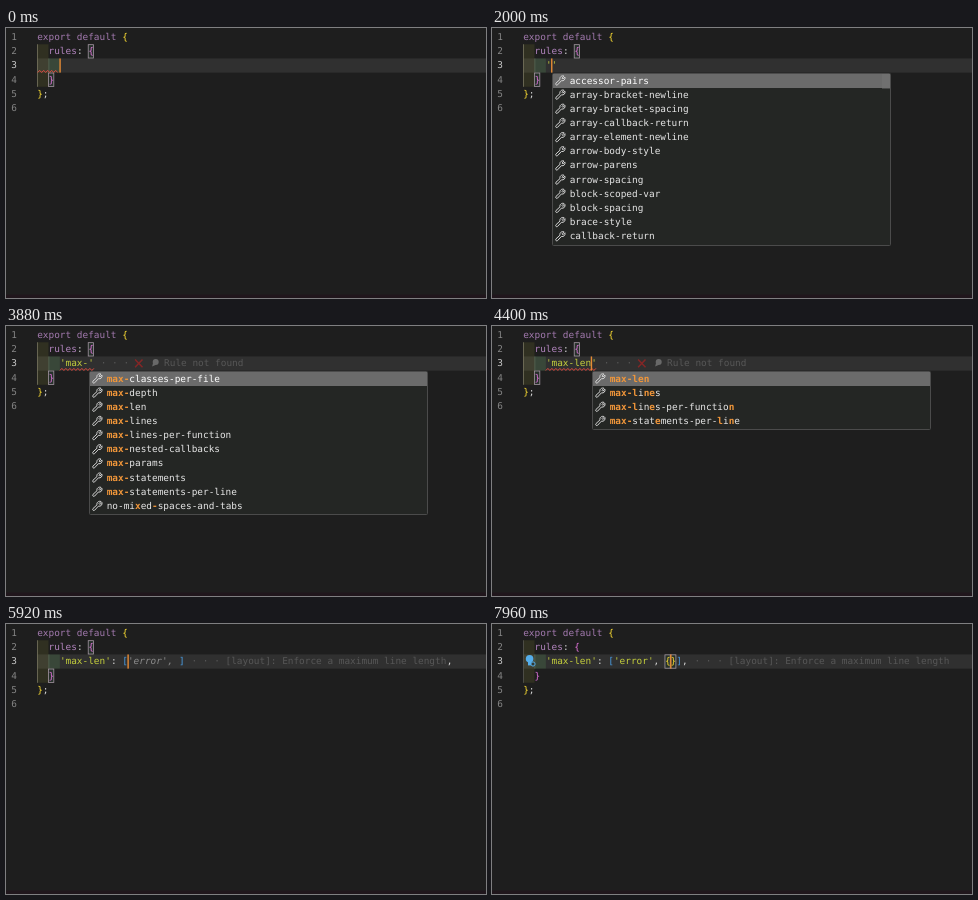
These frames come from a looping animation (480x270 px, 8000 ms). An HTML page:

```html
<!DOCTYPE html>
<html lang="en">
<head>
<meta charset="utf-8">
<title>Editor completion</title>
<style>
  html, body { margin: 0; width: 100%; height: 100%; overflow: hidden; background: #1e1e1e; }
  svg { display: block; width: 480px; height: 270px; }
  text {
    font: 9.42px "DejaVu Sans Mono", monospace;
    white-space: pre;
    text-rendering: geometricPrecision;
    fill: #d8d8d8;
  }
  .key { fill: #a279ae; }
  .prop { fill: #b184bd; }
  .gold { fill: #ffe033; }
  .pink { fill: #e274dc; }
  .blue { fill: #4a9fe6; }
  .str { fill: #c4ce3c; }
  .hint { fill: #8c8c8c; font-style: italic; }
  .ghost { fill: #575757; }
  .num { fill: #858585; }
  .now { fill: #c6c6c6; }
  .row { fill: #e6e6e6; }
  .picked { fill: #fff; }
  .hit { fill: #f0963a; font-weight: bold; }
</style>
</head>
<body>
<svg id="stage" viewBox="0 0 480 270" xmlns="http://www.w3.org/2000/svg"></svg>
<script>
const LOOP = 8000, X0 = 31.2, CW = 5.67, LH = 14.17, ROW = 14.16, TOP = 2.1;
const stage = document.getElementById('stage');

const colX = c => X0 + c * CW;
const lineY = n => TOP + (n - 1) * LH;
const baseY = n => lineY(n) + 10;
const esc = s => s.replace(/&/g, '&amp;').replace(/</g, '&lt;');
const rect = (x, y, w, h, fill, extra = '') =>
  `<rect x="${x}" y="${y}" width="${w}" height="${h}" fill="${fill}" ${extra}/>`;
const text = (x, y, s, cls = '') => `<text x="${x}" y="${y}" class="${cls}">${esc(s)}</text>`;
const code = (line, col, s, cls) => text(colX(col), baseY(line), s, cls);

const MAX = ['max-classes-per-file', 'max-depth', 'max-len', 'max-lines', 'max-lines-per-function',
  'max-nested-callbacks', 'max-params', 'max-statements', 'max-statements-per-line'];

// Angle brackets mark matched letters when they are not one run.
const LISTS = {
  all: { q: '', bar: 15, rows: ['accessor-pairs', 'array-bracket-newline', 'array-bracket-spacing',
    'array-callback-return', 'array-element-newline', 'arrow-body-style', 'arrow-parens',
    'arrow-spacing', 'block-scoped-var', 'block-spacing', 'brace-style', 'callback-return'] },
  m: { q: 'm', bar: 22, rows: [...MAX, 'multiline-comment-style', 'multiline-ternary', 'id-match'] },
  ma: { q: 'ma', bar: 31, rows: [...MAX, 'id-match', 'no-magic-numbers', 'no-<m>ulti-<a>ssign'] },
  max: { q: 'max', rows: [...MAX, 'no-mi<x>ed-oper<a>tors', 'no-mi<x>ed-sp<a>ces-and-tabs'] },
  dash: { q: 'max-', rows: [...MAX, 'no-mi<x>ed<->spaces-and-tabs'] },
  l: { q: 'max-l', rows: ['max-len', 'max-lines', 'max-lines-per-function', '<max->c<l>asses-per-file',
    '<max->nested-ca<l>lbacks', '<max->statements-per-<l>ine'] },
  le: { q: 'max-le', rows: ['max-len', '<max-l>in<e>s', '<max-l>in<e>s-per-function', '<max->c<l>ass<e>s-per-file'] },
  len: { q: 'max-len', rows: ['max-len', '<max-l>i<ne>s', '<max-l>in<e>s-per-functio<n>',
    '<max->stat<e>ments-per-<l>i<n>e'] }
};

const BAD = 'bad', GOOD = '[layout]: Enforce a maximum line length';
const quoted = s => [[`'${s}'`, 'str']];
const typing = (s, list, note = BAD) =>
  ({ parts: quoted(s), cur: 5 + s.length, list, note, wavy: note === BAD });
const head = [["'max-len'", 'str'], [': ', '']];
const open = [...head, ['[', 'blue']];
const filled = [...open, ["'error'", 'str'], [', ', '']];
const pair = [...filled, ['{}', 'gold'], [']', 'blue']];

const STEPS = [
  [0, { parts: [], cur: 4, wavy: true }],
  [1440, { parts: quoted(''), cur: 5 }],
  [1640, { parts: quoted(''), cur: 5, list: 'all' }],
  [2120, typing('m', 'm')],
  [2320, typing('ma', 'ma')],
  [2640, typing('max', 'max')],
  [3040, typing('max-', 'dash')],
  [3960, typing('max-l', 'l')],
  [4160, typing('max-le', 'le')],
  [4360, typing('max-len', 'len')],
  [4560, typing('max-len', 'len', GOOD)],
  [4960, { parts: head, cur: 15, note: GOOD }],
  [5920, { parts: [...open, ["'error', ", 'hint'], [']', 'blue']], cur: 16, note: GOOD, tail: ',' }],
  [6200, { parts: [...filled, [']', 'blue']], cur: 25, note: GOOD, tail: ',' }],
  [6480, { parts: pair, cur: 26, note: GOOD, tail: ',', inner: true }],
  [6960, { parts: [...pair, [',', '']], cur: 26, note: GOOD, inner: true }],
  [7280, { parts: [...pair, [',', '']], cur: 26, note: GOOD, inner: true, bulb: true }]
];
const BLINKS = [[720, 1200], [3520, 3960], [5440, 5920], [7440, 7840]];

function boxAt(line, col) {
  return rect(colX(col), lineY(line) + 0.4, CW - 0.4, LH - 0.8, '#26302a',
    'stroke="#a497a2" stroke-width=".8"');
}

function wave(from, to) {
  let d = `M${from} 44.5`;
  for (let x = from + 2, up = true; x <= to; x += 2, up = !up) d += `L${x} ${up ? 42.4 : 44.5}`;
  return `<path d="${d}" fill="none" stroke="#e04c40" stroke-width="1"/>`;
}

function note(col, s, tail) {
  const x = colX(col) + 1.2, y = baseY(3);
  const dots = text(x, y, ' · · · ', 'ghost');
  if (s !== BAD) {
    const end = x + (7 + s.length) * CW;
    return dots + text(x + 7 * CW, y, s, 'ghost') + (tail ? text(end, y, tail) : '');
  }
  return dots +
    `<path d="M${x + 40} 33.6l7.4 7.6m0-7.6l-7.4 7.6" stroke="#842626" stroke-width="1.5"/>` +
    `<circle cx="${x + 60.6}" cy="36" r="3" fill="#696969"/>` +
    `<path d="M${x + 58} 36.5l-1 4 4-1.8z" fill="#696969"/>` +
    text(x + 69, y, 'Rule not found', 'ghost');
}

function wrench(x, y) {
  return `<path transform="translate(${x} ${y})" d="M9.3 1.5L7.3 3.5 8.2 4.4 10.2 2.4C11 4.6 9 6.8 6.7 6.1
    L2.9 10.2C1.9 11.2 .2 9.7 1.3 8.5L5.3 4.8C4.6 2.6 7 .5 9.3 1.5Z"
    fill="none" stroke="#dcdcdc" stroke-width=".95" stroke-linejoin="round"/>`;
}

function spans(s, q) {
  const marked = s.includes('<') || !q ? s : s.replace(q, `<${q}>`);
  return marked.split(/[<>]/)
    .map((part, i) => i % 2 ? `<tspan class="hit">${part}</tspan>` : part).join('');
}

// The popup sits on whole pixels, so its edges stay crisp.
function popup(cur, { q, rows, bar }) {
  const x = Math.floor(colX(cur) + 1.35) + 0.5, y = 45.5, w = 338;
  const h = Math.floor(rows.length * ROW + 2.1);
  let out = rect(x, y, w, h, '#242624', 'stroke="#4b4b4b" stroke-width="1" rx="1"');
  out += rect(x + 0.5, y + 0.5, w - 1, 14, '#6b6b6b');
  if (bar) out += rect(x + w - 8.5, y + 0.5, 8, bar, '#797979', 'fill-opacity=".4"');
  rows.forEach((s, i) => {
    const base = y + 10 + i * ROW;
    out += wrench(x + 2.2, base - 8.9) +
      `<text class="row ${i ? '' : 'picked'}" x="${x + 17.2}" y="${base}">${spans(s, q)}</text>`;
  });
  return out;
}

function bulb() {
  return '<circle cx="37.6" cy="34.8" r="3.8" fill="#55aeea"/>' +
    rect(36, 38, 3.2, 3.4, '#55aeea') +
    '<circle cx="41" cy="40" r="2.1" fill="#303a35" stroke="#55aeea" stroke-width="1"/>';
}

function scene(s, cursorOn) {
  let out = rect(0, 0, 480, 270, '#1e1e1e') + rect(0, 266.5, 480, 3.5, '#20161c');
  out += rect(X0, lineY(3), 480 - X0, LH, '#303030');
  out += rect(X0, lineY(2), 2 * CW, 3 * LH, '#ffff40', 'fill-opacity=".08"');
  out += rect(colX(2), lineY(3), 2 * CW, LH, '#7fff7f', 'fill-opacity=".11"');
  out += rect(X0 - 0.2, lineY(2), 0.8, 3 * LH, s.inner ? '#565650' : '#77755f');
  out += rect(colX(2), lineY(3), 0.7, LH, '#5d6a58');
  for (let n = 1; n <= 6; n++) out += text(5.2, baseY(n), String(n), n === 3 ? 'num now' : 'num');

  out += s.inner ? boxAt(3, 25) + boxAt(3, 26) : boxAt(2, 9) + boxAt(4, 2);
  out += code(1, 0, 'export default', 'key') + code(1, 15, '{', 'gold');
  out += code(2, 2, 'rules', 'prop') + code(2, 7, ':') + code(2, 9, '{', 'pink');
  out += code(4, 2, '}', 'pink') + code(5, 0, '}', 'gold') + code(5, 1, ';');

  let col = 4;
  for (const [str, cls] of s.parts) {
    out += code(3, col, str, cls);
    col += str.length;
  }
  if (s.wavy) out += s.parts.length ? wave(colX(4), colX(col)) : wave(X0 + 0.5, colX(4) - 1);
  if (s.note) out += note(col, s.note, s.tail);
  if (s.bulb) out += bulb();
  if (cursorOn) out += rect(colX(s.cur) - 0.5, lineY(3), 1.4, LH, '#e58a35');
  if (s.list) out += popup(s.cur, LISTS[s.list]);
  return out;
}

let shown = '';
function draw(t) {
  let i = STEPS.length - 1;
  while (STEPS[i][0] > t) i--;
  const on = !BLINKS.some(([a, b]) => t >= a && t < b);
  const key = i + '/' + on;
  if (key === shown) return;
  shown = key;
  stage.innerHTML = scene(STEPS[i][1], on);
}

const start = performance.now();
function tick() {
  draw((performance.now() - start) % LOOP);
  requestAnimationFrame(tick);
}
tick();
</script>
</body>
</html>
```
